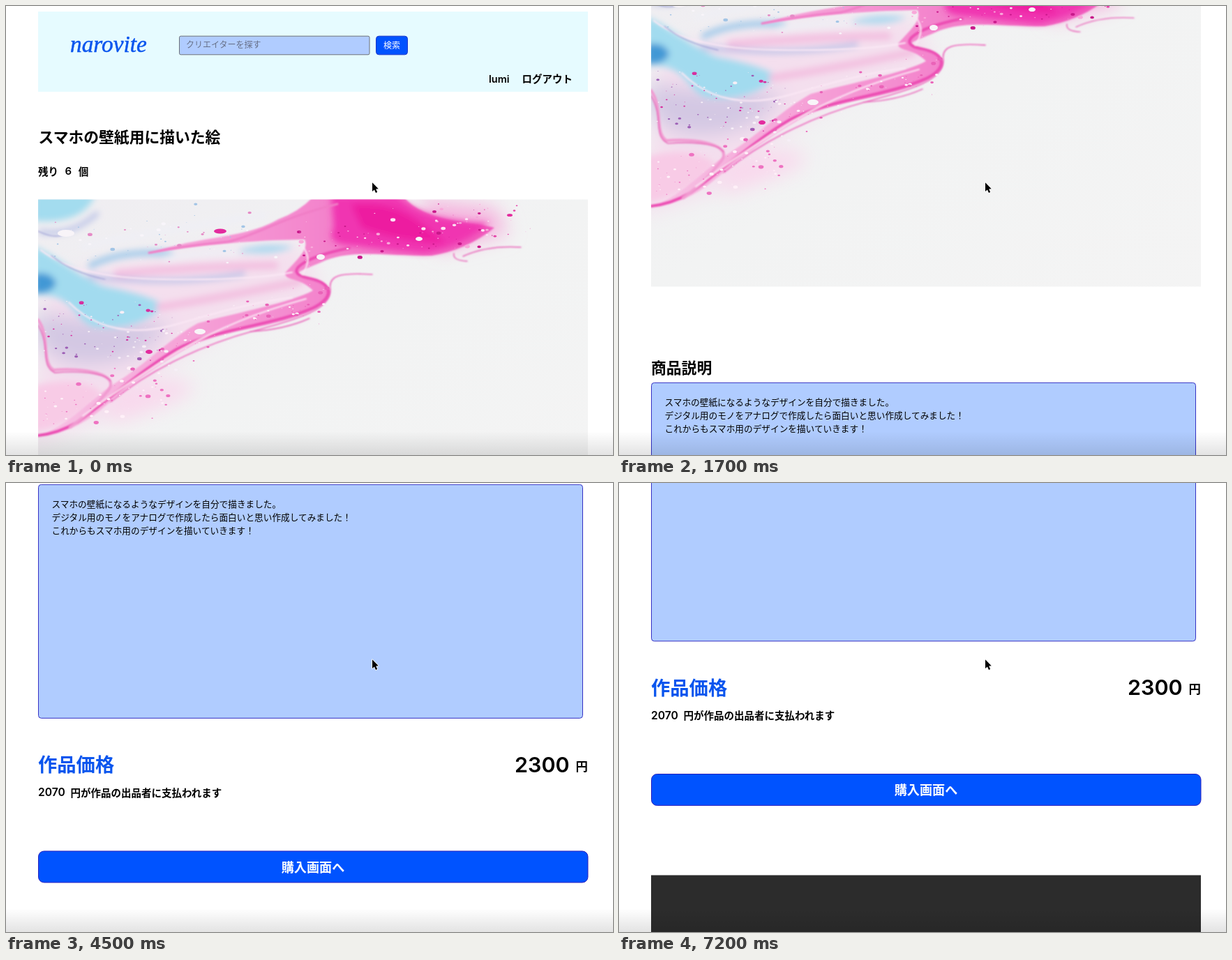
An HTML page that plays this animation: 870 by 644 pixels, repeating every 7.3 s.

```html
<!DOCTYPE html>
<html lang="ja">
<head>
<meta charset="utf-8">
<style>
  html, body { margin: 0; width: 100%; height: 100%; overflow: hidden; background: #fff; }
  svg { display: block; }
  text { font-family: "Noto Sans CJK JP", "Noto Sans CJK", sans-serif; }
  .bold { font-weight: 700; }
  .latin { font-family: Inter, sans-serif; font-weight: 600; }
  .logo { font: italic 33.3px "Liberation Serif", serif; stroke-width: .5; }
  .h2 { font-size: 21.8px; }
  .small { font-size: 14.5px; }
  .body { font-size: 12.67px; }
  #art path { stroke-linecap: round; }
</style>
</head>
<body>
<svg width="870" height="644" viewBox="0 0 870 644">
  <defs>
    <clipPath id="canvas"><rect x="46" y="277.5" width="788" height="454"/></clipPath>
    <linearGradient id="paper" x2="1" y2="1">
      <stop stop-color="#efedf1"/><stop offset=".5" stop-color="#f2f3f3"/><stop offset="1" stop-color="#f4f4f4"/>
    </linearGradient>
    <linearGradient id="wash">
      <stop stop-color="#f7c3e4"/><stop offset=".4" stop-color="#f59bd5"/><stop offset="1" stop-color="#f15cbd"/>
    </linearGradient>
    <linearGradient id="shade" x2="0" y2="1">
      <stop stop-opacity="0"/><stop offset="1" stop-opacity=".11"/>
    </linearGradient>
    <filter id="haze" x="-30%" y="-50%" width="160%" height="200%"><feGaussianBlur stdDeviation="14"/></filter>
    <filter id="soft" x="-30%" y="-50%" width="160%" height="200%"><feGaussianBlur stdDeviation="5"/></filter>
    <filter id="edge" x="-20%" y="-20%" width="140%" height="140%"><feGaussianBlur stdDeviation="1.2"/></filter>
  </defs>

  <g id="page">
    <rect x="46" y="8" width="788" height="115" fill="#e6fbff"/>
    <text class="logo" x="92" y="66" fill="#0a55ee" stroke="#0a55ee">narovite</text>
    <rect x="248.5" y="43.2" width="272.5" height="26.6" rx="2" fill="#b0ccff" stroke="#6c7078"/>
    <text x="258" y="60.4" font-size="12" fill="#677087">クリエイターを探す</text>
    <rect x="530.5" y="43.2" width="45" height="26.6" rx="4" fill="#0053ff" stroke="#1b35c8"/>
    <text x="541" y="60.6" font-size="12" font-weight="500" fill="#fff">検索</text>
    <text class="latin small" x="692" y="109.5">lumi</text>
    <text class="bold small" x="739.5" y="110">ログアウト</text>

    <text class="bold h2" x="46.5" y="196.3">スマホの壁紙用に描いた絵</text>
    <text class="bold small" x="46" y="242.5">残り</text>
    <text class="latin" x="84.5" y="242.3" font-size="15">6</text>
    <text class="bold small" x="103.7" y="242.5">個</text>

    <g id="art" clip-path="url(#canvas)" fill="none">
      <rect x="46" y="277" width="788" height="455" fill="url(#paper)"/>
      <g filter="url(#haze)">
        <path fill="#f4dfee" d="M60 400 C180 345 330 360 420 340 L450 400 430 430 330 455 220 520 150 590 30 630Z"/>
        <path fill="#d3c8e3" d="M40 440 C110 450 190 450 235 455 Q200 510 130 515 T40 470Z"/>
        <path fill="#f9d8ed" d="M150 565 Q230 525 262 540 T150 600Z"/>
        <path fill="#f5b0dd" d="M590 277 L700 290 720 325 620 350Z"/>
      </g>
      <g filter="url(#soft)">
        <path fill="#a3dcef" d="M40 270 H128 C118 298 90 312 40 308Z"/>
        <path fill="#a2dbef" d="M40 345 C75 360 100 385 140 402 Q195 412 226 428 C212 450 170 466 125 460 C95 448 98 412 40 414Z"/>
        <path fill="#b0d9ef" d="M328 352 Q370 337 412 345 Q385 360 328 352Z"/>
        <path stroke="#a3cbea" stroke-width="9" d="M122 372 Q165 350 235 355"/>
        <path stroke="#b6bfe6" stroke-width="6" d="M50 324 Q95 330 130 298 M120 388 Q240 402 340 384"/>
        <path stroke="#f3c0e0" stroke-width="11" d="M160 384 Q270 374 385 372 M220 432 Q310 418 420 395"/>
        <path stroke="#efeff5" stroke-width="9" d="M110 345 Q230 320 370 300 M230 362 Q280 352 330 354"/>
        <path fill="#4398d5" d="M40 384 Q66 380 72 398 Q65 414 40 412Z"/>
        <path fill="#f8cbe6" d="M40 545 Q105 528 138 555 Q115 595 40 612Z"/>
      </g>
      <g filter="url(#edge)">
        <path fill="url(#wash)" d="M205 355 C270 330 340 335 390 306 Q420 295 440 274 H570 C600 310 670 310 700 318 Q660 350 610 358 C540 358 500 350 460 364 C420 382 405 382 435 391 C478 400 472 424 430 441 C380 461 320 464 270 485 C215 515 170 550 135 580 Q95 613 46 617 C90 600 110 575 150 545 C200 515 230 480 275 455 C330 440 410 425 440 408 C420 388 400 395 400 383 C415 365 435 350 428 335 C380 335 290 340 205 355Z"/>
      </g>
      <g filter="url(#soft)">
        <path fill="#f034b1" d="M466 272 H560 C600 308 650 308 692 312 Q655 346 600 355 Q545 350 500 344 Q455 342 470 318Z"/>
        <path fill="#ed1aa0" d="M495 285 Q550 278 590 308 T628 340 Q560 338 510 318Z"/>
      </g>
      <g filter="url(#edge)">
        <path stroke="#ec4db3" stroke-width="4" d="M492 347 C420 362 398 383 432 390 C473 398 468 420 440 433 C380 459 300 463 245 492 C200 518 140 570 102 597 Q75 613 46 616"/>
        <path stroke="#ec64bb" stroke-width="1.6" d="M525 385 C480 382 461 386 465 407 C465 436 420 448 355 466 C270 489 200 527 150 568"/>
        <path stroke="#f07dc6" stroke-width="3" d="M205 354 Q260 343 318 338 C360 329 390 305 475 284"/>
        <path stroke="#f19bd1" stroke-width="4" d="M46 450 C64 475 50 510 68 522 C110 518 166 528 146 552 S118 585 92 604"/>
        <path stroke="#e85bb5" stroke-width="1.4" d="M46 458 C65 490 48 515 70 526 C120 522 145 530 150 538 M350 467 Q400 464 435 448 M642 355 Q640 365 661 366 M655 359 Q690 343 738 346"/>
        <path stroke="#fbe8f5" stroke-width="2" d="M50 350 Q100 390 225 392 T410 382 M90 425 Q150 485 250 455 T410 418 M110 588 Q160 550 240 500 T430 420 M425 345 Q440 362 425 385"/>
        <path stroke="#9a9dd4" stroke-width="1.2" d="M46 323 Q72 335 83 327 M65 358 Q94 382 142 392"/>
      </g>
      <g id="dots"></g>
      <g fill="#f8f4f8">
        <ellipse cx="86" cy="326" rx="12" ry="5"/>
        <ellipse cx="278" cy="467" rx="8" ry="4"/>
        <ellipse cx="451" cy="360" rx="6" ry="4"/>
        <ellipse cx="592" cy="334" rx="5" ry="3"/>
      </g>
      <g fill="#e32b9e">
        <ellipse cx="307" cy="323" rx="9" ry="3.5"/>
        <ellipse cx="205" cy="496" rx="5" ry="3"/>
        <ellipse cx="722" cy="300" rx="4" ry="2"/>
      </g>
    </g>

    <text class="bold h2" x="46" y="856.3">商品説明</text>
    <rect x="46.5" y="869.3" width="780" height="335" rx="4" fill="#b0ccff" stroke="#3531c4"/>
    <text class="body" x="65.5" y="901.8">スマホの壁紙になるようなデザインを自分で描きました。</text>
    <text class="body" x="65.5" y="921">デジタル用のモノをアナログで作成したら面白いと思い作成してみました！</text>
    <text class="body" x="65.5" y="940.2">これからもスマホ用のデザインを描いていきます！</text>

    <text class="bold" x="46" y="1281.4" font-size="27.3" fill="#0a55ee">作品価格</text>
    <text class="latin" x="729" y="1281.8" font-size="30.5">2300</text>
    <text class="bold" x="816.5" y="1279.8" font-size="17.4">円</text>
    <text class="latin" x="46" y="1316.3" font-size="15.6">2070</text>
    <text class="bold small" x="92.5" y="1316.5">円が作品の出品者に支払われます</text>

    <rect x="46.5" y="1395" width="787.5" height="45" rx="8" fill="#0053ff" stroke="#2a20bd"/>
    <text class="bold" x="440" y="1424.5" font-size="18.1" text-anchor="middle" fill="#fff">購入画面へ</text>

    <rect x="46" y="1540" width="788" height="300" fill="#2c2c2c"/>
    <text class="logo" x="441" y="1653" style="font-size:41.5px" text-anchor="middle" fill="#fff" stroke="#fff">narovite</text>
  </g>

  <rect y="610" width="870" height="34" fill="url(#shade)"/>
  <path d="M525 253.2 V266 L527.9 263.4 L530 268 L532.2 267 L530.2 262.6 L533.8 262.2Z" fill="#000" stroke="#fff" stroke-width="1.6" stroke-linejoin="round" paint-order="stroke"/>
</svg>

<script>
const page = document.getElementById('page');
const DURATION = 7300, STEP = 100;

// Scroll position over time: [ms, px]
const scrollKeys = [
  [0, 0], [1100, 143.5], [2500, 594], [3200, 690], [3700, 726], [4000, 775],
  [4500, 867], [4800, 905], [5500, 1011], [6000, 1046], [6400, 1042], [7200, 977.5],
];

const slope = i => (scrollKeys[i + 1][1] - scrollKeys[i][1]) / (scrollKeys[i + 1][0] - scrollKeys[i][0]);

// Harmonic-mean tangents keep the curve free of overshoot
function tangent(i) {
  if (i === 0) return 0;
  if (i === scrollKeys.length - 1) return slope(i - 1);
  const a = slope(i - 1), b = slope(i);
  return a * b > 0 ? 2 * a * b / (a + b) : 0;
}

function scrollAt(time) {
  let i = 0;
  while (i < scrollKeys.length - 2 && time > scrollKeys[i + 1][0]) i++;
  const [t0, y0] = scrollKeys[i], [t1, y1] = scrollKeys[i + 1];
  const span = t1 - t0, u = (time - t0) / span, v = 1 - u;
  return v * v * (1 + 2 * u) * y0 + u * u * (3 - 2 * u) * y1
    + span * u * v * (v * tangent(i) - u * tangent(i + 1));
}

let seed = 7;
const random = () => (seed = seed * 16807 % 2147483647) / 2147483647;

// Paint droplets scattered around a tilted line
function splatter(count, x0, y0, x1, y1, spread, colours, maxRadius) {
  let dots = '';
  for (let i = 0; i < count; i++) {
    const u = random(), r = .5 + maxRadius * random() ** 3;
    const x = x0 + (x1 - x0) * u, y = y0 + (y1 - y0) * u + (random() + random() - 1) * spread;
    const colour = colours[Math.floor(random() * colours.length)];
    dots += `<ellipse cx="${x}" cy="${y}" rx="${r * 1.2}" ry="${r * .8}" fill="${colour}"/>`;
  }
  return dots;
}

document.getElementById('dots').innerHTML =
  splatter(90, 420, 345, 700, 310, 42, ['#fbe3f3', '#f9a9da', '#c8188a'], 2.6) +
  splatter(90, 50, 470, 250, 480, 55, ['#d62f9f', '#9d5fb5', '#f7eff7'], 2.4) +
  splatter(70, 50, 575, 240, 545, 45, ['#fff0f8', '#ee72c1'], 2.8) +
  splatter(70, 180, 500, 460, 420, 42, ['#fdf0f8', '#ea62b8'], 2.5) +
  splatter(60, 70, 330, 400, 325, 50, ['#f8f5fa', '#e58bc6', '#a3c5e6'], 2.4) +
  splatter(14, 640, 305, 760, 305, 40, ['#e543aa', '#f3a4d7'], 1.6);

function draw() {
  const time = Math.floor(performance.now() % DURATION / STEP) * STEP;
  page.setAttribute('transform', `translate(0 ${-scrollAt(time)})`);
  requestAnimationFrame(draw);
}
draw();
</script>
</body>
</html>
```
